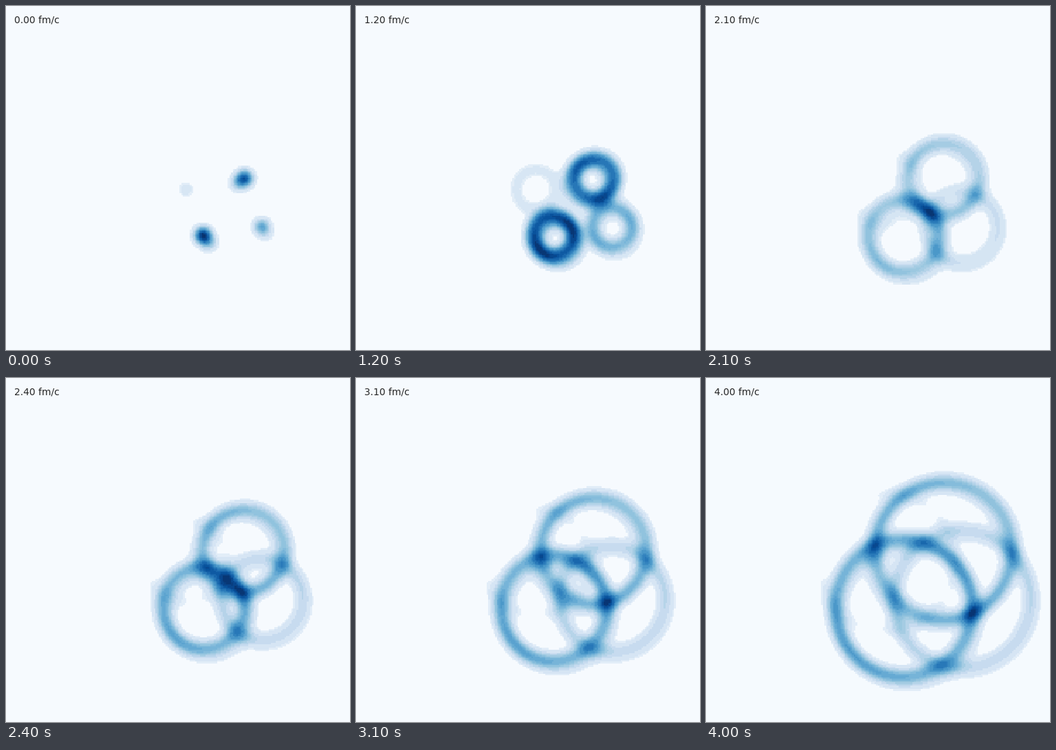
Write a matplotlib script that moves like this. It is 500 px wide and 500 px high and loops after 4.1 s.

```python
import numpy as np
import matplotlib
import matplotlib.pyplot as plt
from matplotlib.animation import FuncAnimation

SIZE, DPI = 500, 100
FRAMES, STEP_MS = 41, 100
CELLS = 200
SPEED = 25.0   # pixels per fm
SIGMA = 9.0    # width of one source, in pixels

# x, y, weight of each source
SOURCES = [
    (286.5, 333.5, 0.90), (295.5, 345.0, 0.30),
    (347.5, 250.5, 0.75), (337.0, 258.0, 0.28),
    (372.0, 321.0, 0.50), (379.0, 333.0, 0.11),
    (262.0, 267.0, 0.165),
]

axis = (np.arange(CELLS) + 0.5) * SIZE / CELLS
gx, gy = np.meshgrid(axis, axis)
dists = [np.hypot(gx - x, gy - y) for x, y, _ in SOURCES]
radii = np.linspace(0, 500, 1001)
angles = (np.arange(240) + 0.5) * np.pi / 240

# colour map entries grouped into coarse bands
blues = matplotlib.colormaps["Blues"](np.arange(256), bytes=True)[:, :3].astype(int)
keys = (blues[:, 0] >> 5) * 128 + (blues[:, 1] >> 4) * 8 + (blues[:, 2] >> 5)
bands = np.unique(keys, return_inverse=True)[1].ravel()


def ring_profile(radius):
    """Gaussian averaged over all directions after moving out by radius."""
    d2 = (radii[:, None] ** 2 + radius ** 2
          - 2 * radii[:, None] * radius * np.cos(angles))
    return np.exp(-d2 / (2 * SIGMA ** 2)).mean(axis=1)


def density(time):
    profile = ring_profile(SPEED * time)
    total = sum(w * np.interp(d, radii, profile)
                for d, (_, _, w) in zip(dists, SOURCES))
    return total / total.max()


def banded(values):
    """Paint each band in the mean colour of its cells."""
    index = np.minimum((values * 256).astype(int), 255)
    counts = np.bincount(index.ravel(), minlength=256)
    weight = np.maximum(np.bincount(bands, counts), 1)
    means = np.stack([np.bincount(bands, counts * blues[:, c]) / weight
                      for c in range(3)], axis=1)
    return means[bands[index]].astype(np.uint8)


fig = plt.figure(figsize=(SIZE / DPI, SIZE / DPI), dpi=DPI)
ax = fig.add_axes([0, 0, 1, 1])
ax.set_axis_off()
image = ax.imshow(banded(density(0)), extent=(0, SIZE, SIZE, 0),
                  interpolation="nearest", aspect="auto")
label = ax.text(12, 24, "0.00 fm/c", fontsize=10, color="#262626",
                family="DejaVu Sans", va="baseline")


def update(frame):
    time = frame * STEP_MS / 1000
    image.set_data(banded(density(time)))
    label.set_text(f"{time:.2f} fm/c")
    return image, label


anim = FuncAnimation(fig, update, frames=FRAMES, interval=STEP_MS,
                     repeat=True, repeat_delay=0)
plt.show()
```
